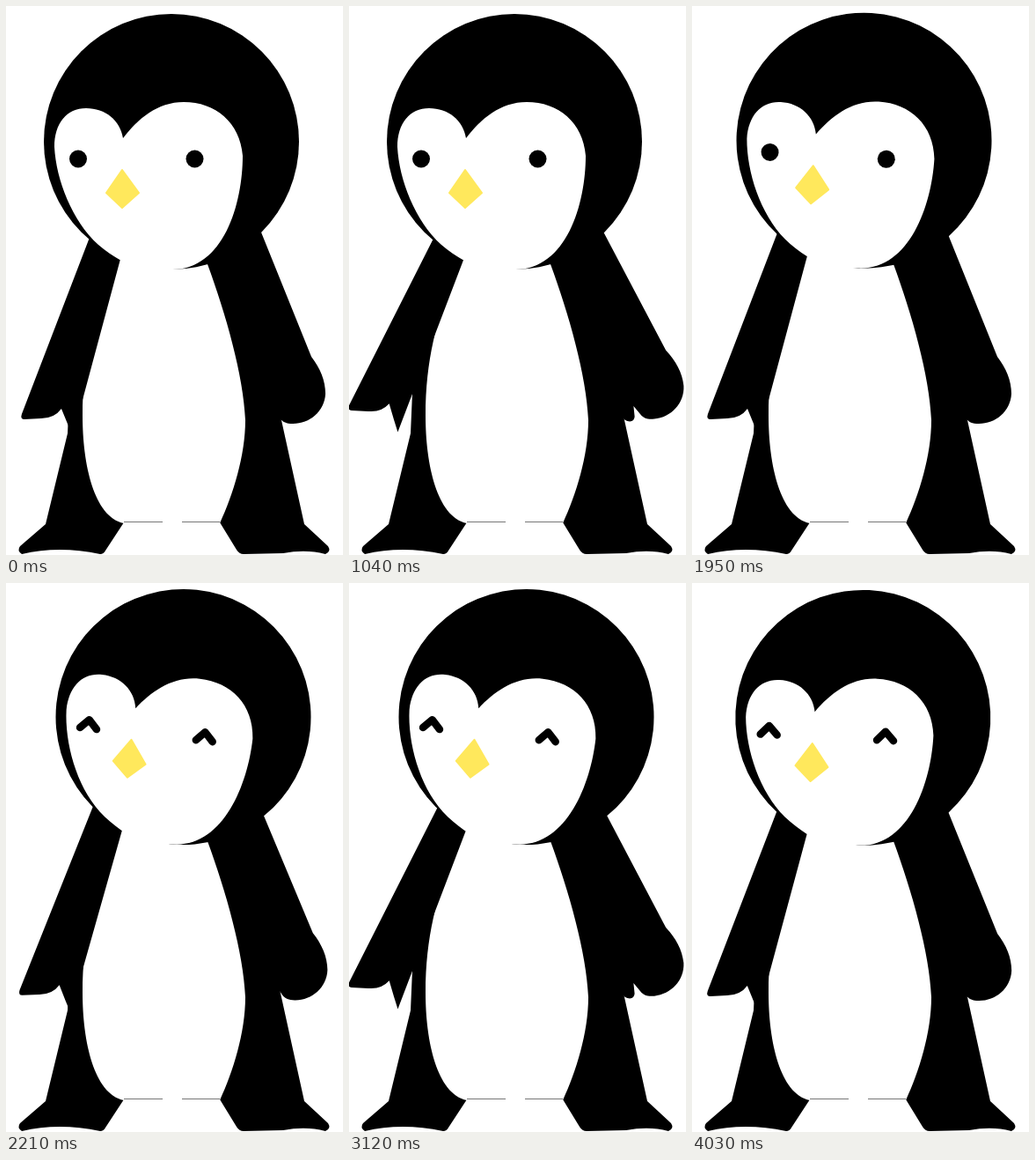
An HTML page with a canvas for the animation above (4.16 s loop, 383x623 px).

```html
<!DOCTYPE html>
<html>
<head>
<meta charset="utf-8">
<title>Penguin</title>
<style>
html, body { margin: 0; width: 100%; height: 100%; overflow: hidden; background: #fff; }
canvas { display: block; }
</style>
</head>
<body>
<canvas id="stage" width="383" height="623"></canvas>
<script>
const ctx = document.getElementById('stage').getContext('2d');
const STEP = 130, STEPS = 32;
const FLAP = 0.104, TILT = 0.1065;

const shapes = {
  body: 'M105 270 L90 330 L76 400 L72 439 L70 485 L45 588 L16 613 Q12 618 18 622 Q60 612 107 622 Q111 622 113 618 ' +
        'L134 586 L243 586 L262 617 Q265 622 270 622 L315 621 Q341 616 363 622 Q370 619 366 613 L339 588 L313 470 L270 275 Z',
  belly: 'M118 300 L118 270 L222 270 L229 293 C250 350 270 420 272 470 C272 510 258 555 243 587 L134 587 ' +
         'C100 580 87 520 87 465 C87 400 100 360 118 300 Z',
  leftWing: 'M106 234 L140 250 L76 488 L70 474 L63 457 Q55 468 40 468 L21 469 Q16 469 18 463 Z',
  rightWing: 'M278 227 L347 398 C357 411 363 425 363 440 C362 460 345 474 326 474 C318 474 315 472 312 469 ' +
             'L304 457 L304 469 Q303 474 298 474 Q292 473 290 468 L255 290 Z',
  face: 'M133 150 C130 130 113 116 91 116 C69 116 55 133 55 160 C57 197 75 244 105 271 C113 278 122 284 131 289 ' +
        'C150 300 170 302 189 299 C247 299 269 225 269 170 C266 132 238 109 202 109 C172 109 150 128 133 150 Z',
  beak: 'M132 186 L114 212 L132 229 L151 212 Z'
};
for (const k in shapes) shapes[k] = new Path2D(shapes[k]);

function fill(path, color) {
  ctx.fillStyle = color;
  ctx.fill(path);
}

function disc(x, y, r) {
  ctx.beginPath();
  ctx.arc(x, y, r, 0, Math.PI * 2);
  ctx.fillStyle = '#000';
  ctx.fill();
}

function rotated(x, y, angle, paint) {
  ctx.save();
  ctx.translate(x, y);
  ctx.rotate(angle);
  ctx.translate(-x, -y);
  paint();
  ctx.restore();
}

function smooth(a, b, v) {
  const u = Math.min(1, Math.max(0, (v - a) / (b - a)));
  return u * u * (3 - 2 * u);
}

// Two wing beats, the second one slightly slower.
function lift(i) {
  const phase = i < 15.05 ? (i + 0.27) / 15.32 : (i - 15.05) / 16.5;
  return Math.sin(Math.PI * phase) ** 2;
}

function eye(x, y, happy) {
  if (!happy) return disc(x, y, 10);
  ctx.beginPath();
  ctx.moveTo(x - 9.5, y + 5);
  ctx.lineTo(x, y - 5);
  ctx.lineTo(x + 9.5, y + 5);
  ctx.lineWidth = 8.5;
  ctx.strokeStyle = '#000';
  ctx.stroke();
}

function head(happy) {
  disc(188, 154, 145);
  fill(shapes.face, '#fff');
  eye(82, 173.5, happy);
  eye(214.5, 173.5, happy);
  fill(shapes.beak, '#ffe85c');
  ctx.lineWidth = 2;
  ctx.strokeStyle = '#ffe85c';
  ctx.stroke(shapes.beak);
}

function draw(i) {
  const flap = FLAP * lift(i);
  const tilt = TILT * (smooth(13.6, 16.2, i) - smooth(29.8, 32.1, i));
  ctx.fillStyle = '#fff';
  ctx.fillRect(0, 0, 383, 623);
  ctx.lineCap = ctx.lineJoin = 'round';

  fill(shapes.body, '#000');
  fill(shapes.belly, '#fff');
  ctx.fillStyle = '#777';
  ctx.fillRect(134, 585, 44, 1);
  ctx.fillRect(200, 585, 43, 1);

  rotated(110, 285, flap, () => fill(shapes.leftWing, '#000'));
  rotated(284, 266, -flap, () => fill(shapes.rightWing, '#000'));
  rotated(213.5, 279.8, tilt, () => head(i >= 16));
}

const start = performance.now();
function tick() {
  draw(Math.floor((performance.now() - start) / STEP) % STEPS);
  requestAnimationFrame(tick);
}
tick();
</script>
</body>
</html>
```
